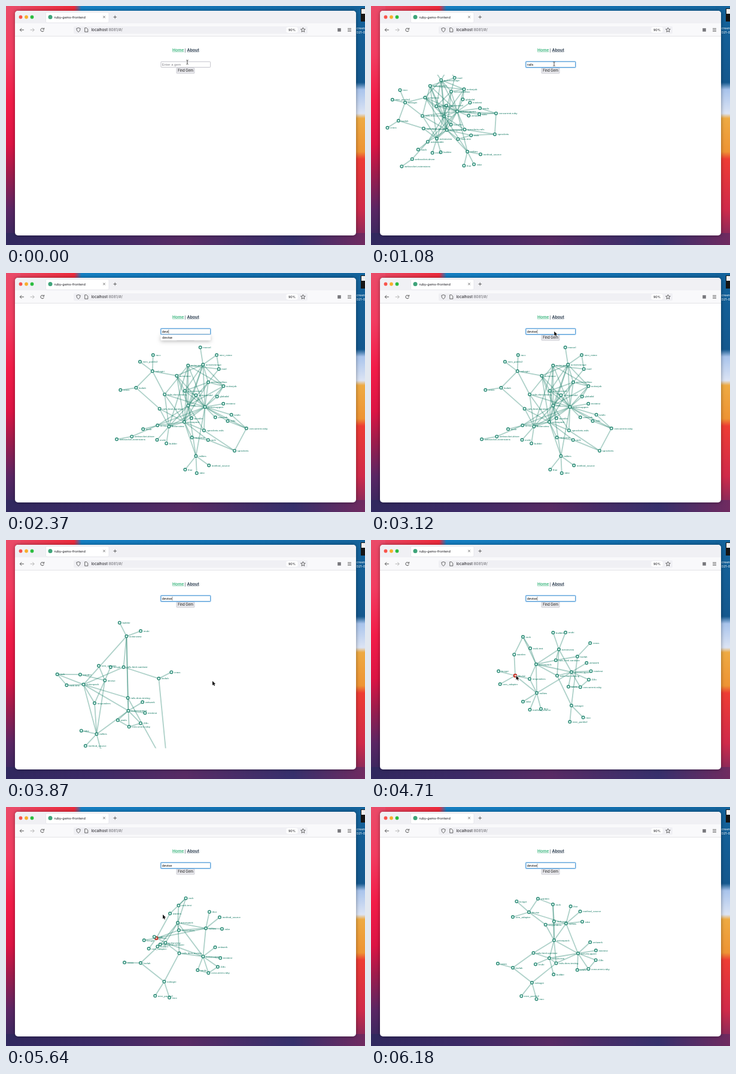
An HTML page with a canvas that plays this animation: 600 by 400 pixels, repeating every 6.21 s.

```html
<!DOCTYPE html>
<html lang="en">
<head>
<meta charset="utf-8">
<title>ruby-gems-frontend</title>
<style>
  html, body { margin: 0; width: 100%; height: 100%; overflow: hidden; }
  canvas { display: block; width: 600px; height: 400px; }
</style>
</head>
<body>
<canvas id="stage" width="600" height="400"></canvas>
<script>
const c = document.getElementById('stage').getContext('2d');
const LOOP = 6210;
const SANS = '"Liberation Sans", Arial, sans-serif';
const UI = 'Inter, "Open Sans", sans-serif';

// Which gem depends on which
const deps = {
  'rails': 'actioncable actionmailbox actionmailer actionpack actiontext actionview activejob activemodel activerecord activestorage activesupport bundler railties sprockets-rails',
  'actioncable': 'actionpack activesupport nio4r websocket-driver',
  'actionmailbox': 'actionpack activejob activerecord activestorage activesupport mail',
  'actionmailer': 'actionpack actionview activejob activesupport mail rails-dom-testing',
  'actionpack': 'actionview activesupport rack rack-test rails-dom-testing rails-html-sanitizer',
  'actiontext': 'actionpack activerecord activestorage activesupport nokogiri',
  'actionview': 'activesupport builder erubi rails-dom-testing rails-html-sanitizer',
  'activejob': 'activesupport globalid',
  'activemodel': 'activesupport',
  'activerecord': 'activemodel activesupport',
  'activestorage': 'actionpack activejob activerecord activesupport marcel mini_mime',
  'activesupport': 'concurrent-ruby i18n minitest tzinfo zeitwerk',
  'railties': 'actionpack activesupport method_source rake thor',
  'sprockets-rails': 'actionpack activesupport sprockets',
  'sprockets': 'concurrent-ruby rack',
  'tzinfo': 'concurrent-ruby',
  'i18n': 'concurrent-ruby',
  'globalid': 'activesupport',
  'mail': 'mini_mime',
  'rack-test': 'rack',
  'rails-dom-testing': 'activesupport nokogiri',
  'rails-html-sanitizer': 'loofah',
  'loofah': 'crass nokogiri',
  'nokogiri': 'mini_portile2 racc',
  'websocket-driver': 'websocket-extensions',
  'devise': 'bcrypt orm_adapter railties responders warden',
  'responders': 'actionpack railties',
  'warden': 'rack'
};

// Everything a gem needs, directly or through other gems
function makeGraph(root) {
  const names = [root], links = [];
  for (let i = 0; i < names.length; i++) {
    if (!deps[names[i]]) continue;
    for (const d of deps[names[i]].split(' ')) {
      if (!names.includes(d)) names.push(d);
      links.push([i, names.indexOf(d)]);
    }
  }
  return { names, links };
}

// Hubs stay where they are put; springs and repulsion arrange the rest
function relax(g, hubs, at) {
  const pin = g.names.map(n => hubs.indexOf(n));
  const near = g.names.map((_, i) =>
    g.links.filter(l => l.includes(i)).map(l => l[0] === i ? l[1] : l[0]));
  const hub = k => [at[2 * k], at[2 * k + 1]];
  const mean = pts => [0, 1].map(a => pts.reduce((s, p) => s + p[a], 0) / pts.length);
  const mid = mean(hubs.map((_, k) => hub(k)));
  const pos = g.names.map((_, i) => {
    if (pin[i] >= 0) return hub(pin[i]);
    const [x, y] = mean(near[i].filter(j => pin[j] >= 0).map(j => hub(pin[j])));
    const a = Math.atan2(y - mid[1], x - mid[0]) + 0.7 * Math.sin(i * 2.4);
    return [x + 22 * Math.cos(a), y + 22 * Math.sin(a)];
  });
  for (let step = 0; step < 260; step++) {
    pos.forEach((p, i) => {
      if (pin[i] >= 0) return;
      let fx = 0, fy = 0;
      pos.forEach((q, j) => {
        const dx = p[0] - q[0], dy = p[1] - q[1], d = Math.hypot(dx, dy);
        if (i === j || d < 0.01) return;
        let f = d < 80 ? 9 / d : 0;
        if (near[i].includes(j)) f -= 0.14 * (d - 20);
        fx += f * dx / d;
        fy += f * dy / d;
      });
      const damp = 0.6 / Math.max(1, Math.hypot(fx, fy) / 3);
      p[0] += fx * damp;
      p[1] += fy * damp;
    });
  }
  return pos.flat();
}

const railsGraph = makeGraph('rails');
const railsHubs = ('nokogiri actiontext actionmailer activestorage mail loofah rails-dom-testing activerecord actionmailbox activejob ' +
  'rails activesupport actionpack actionview actioncable websocket-driver sprockets-rails concurrent-ruby sprockets railties').split(' ');
const railsRest = relax(railsGraph, railsHubs, [
  246,158, 286,168, 306,152, 331,152, 357,161, 217,184, 264,198, 298,194, 338,182, 363,190,
  302,219, 330,223, 294,246, 268,252, 249,249, 205,265, 326,262, 397,263, 375,299, 310,304]);

const deviseGraph = makeGraph('devise');
const deviseHubs = 'rack devise actionpack railties activesupport actionview loofah nokogiri'.split(' ');
const [burst, grabbed, dragged, settled] = [
  [85,225, 165,235, 129,242, 151,325, 204,286, 201,161, 255,232, 270,385],
  [254,162, 241,227, 276,208, 277,256, 335,221, 314,183, 345,195, 335,277],
  [298,145, 242,252, 273,172, 340,209, 317,254, 243,208, 216,255, 261,291],
  [304,163, 264,176, 306,223, 326,195, 346,245, 298,253, 237,269, 269,294]
].map(at => relax(deviseGraph, deviseHubs, at));

const span = (t, a, b) => Math.min(1, Math.max(0, (t - a) / (b - a)));
const easeOut = u => 1 - (1 - u) ** 3;
const smooth = u => u * u * (3 - 2 * u);
const mix = (a, b, u) => a + (b - a) * u;
const mixPose = (p, q, u) => p.map((v, i) => mix(v, q[i], u));

// Scale and turn a pose about (ox, oy), then put that point at (x, y)
function place(pose, ox, oy, x, y, scale, turn) {
  const out = [], cs = Math.cos(turn) * scale, sn = Math.sin(turn) * scale;
  for (let i = 0; i < pose.length; i += 2) {
    const dx = pose[i] - ox, dy = pose[i + 1] - oy;
    out.push(x + dx * cs - dy * sn, y + dx * sn + dy * cs);
  }
  return out;
}

function railsPose(t) {
  if (t >= 1680) {
    const u = span(t, 1680, 2370);
    return place(railsRest, 300, 230, 300 + 3 * u, 230 + 3 * u, 1, -0.06 * u);
  }
  const u = span(t, 900, 1600), k = easeOut(u);
  return place(railsRest, 300, 230, mix(90, 300, smooth(u)), mix(140, 230, k),
    k + 0.25 * Math.sin(Math.PI * k), (k - 1) * 1.2);
}

function devisePose(t) {
  if (t < 3870) {
    const k = mix(0.15, 1, easeOut(span(t, 3650, 3870)));
    return place(burst, 110, 130, 110, 130, k, (k - 1) * 0.6);
  }
  if (t < 4710) return mixPose(burst, grabbed, easeOut(span(t, 3870, 4650)));
  if (t < 5280) return mixPose(grabbed, dragged, smooth(span(t, 4710, 5280)));
  return mixPose(dragged, settled, smooth(span(t, 5280, 6080)));
}

function text(s, x, y, size, color, font = SANS, weight = '', align = 'left') {
  c.font = `${weight} ${size}px ${font}`;
  c.fillStyle = color;
  c.textAlign = align;
  c.fillText(s, x, y);
  return c.measureText(s).width;
}

function box(x, y, w, h, r, fill, stroke, lw = 1) {
  c.beginPath();
  c.roundRect(x, y, w, h, r);
  if (fill) { c.fillStyle = fill; c.fill(); }
  if (stroke) { c.strokeStyle = stroke; c.lineWidth = lw; c.stroke(); }
}

function dot(x, y, r, fill) {
  c.beginPath();
  c.arc(x, y, r, 0, 7);
  c.fillStyle = fill;
  c.fill();
}

function path(pts, color, lw = 0.9, close = false) {
  c.beginPath();
  for (let i = 0; i < pts.length; i += 2) c.lineTo(pts[i], pts[i + 1]);
  if (close) c.closePath();
  c.strokeStyle = color;
  c.lineWidth = lw;
  c.stroke();
}

function fade(x, y, w, h, down, ...stops) {
  const g = down ? c.createLinearGradient(0, y, 0, y + h) : c.createLinearGradient(x, 0, x + w, 0);
  stops.forEach(([at, col]) => g.addColorStop(at, col));
  c.fillStyle = g;
  c.fillRect(x, y, w, h);
}

function desktop() {
  fade(0, 0, 600, 16, false, [0, '#ea4a68'], [0.19, '#ee2a3c'], [0.21, '#1580c4'], [0.6, '#1272b4'], [1, '#13639c']);
  fade(0, 0, 24, 400, true, [0, '#ea4a68'], [0.2, '#f23c60'], [0.4, '#f21c48'], [0.58, '#dc1444'],
    [0.7, '#a01c4c'], [0.85, '#5a2664'], [1, '#30285e']);
  fade(576, 0, 24, 400, true, [0, '#13639c'], [0.32, '#14588e'], [0.35, '#a9c4ec'], [0.45, '#dce4f4'],
    [0.47, '#eeaa42'], [0.61, '#ee9434'], [0.64, '#ee3c34'], [0.85, '#d02a4a'], [1, '#702a60']);
  fade(0, 380, 600, 20, false, [0, '#30285e'], [0.25, '#3c2a66'], [0.5, '#582a64'], [0.8, '#36306c'], [1, '#702a60']);
  box(593, 4, 10, 22, 0, '#151515');
  c.fillStyle = '#f0f0f0';
  c.fillRect(594, 5, 6, 8);
  text('creen', 585.5, 39, 5.4, '#fff', UI);
  text('021-0', 585.5, 46, 5.4, '#fff', UI);
}

function chrome() {
  c.save();
  c.shadowColor = 'rgba(0,0,0,.4)';
  c.shadowBlur = 6;
  box(15, 8, 570, 376, 5, '#fff');
  c.restore();
  c.save();
  c.beginPath();
  c.roundRect(15, 8, 570, 376, 5);
  c.clip();
  c.fillStyle = '#f0f0f4';
  c.fillRect(15, 8, 570, 21);
  c.fillStyle = '#f9f9fb';
  c.fillRect(15, 29, 570, 21);
  c.fillStyle = '#dcdce0';
  c.fillRect(15, 50, 570, 0.8);
  c.restore();

  dot(24.5, 18.5, 2.9, '#f9544c');
  dot(34, 18.5, 2.9, '#f8ae2c');
  dot(43.5, 18.5, 2.9, '#2cbd40');
  box(66.5, 10.5, 105.5, 17.5, 2, '#fff', '#dedee4', 0.6);
  dot(74, 18.4, 3.5, '#3fa47a');
  text('ruby-gems-frontend', 80.5, 20.7, 5.45, '#15141a', UI);
  path([162.2, 16.6, 165.8, 20.2], '#444', 0.7);
  path([165.8, 16.6, 162.2, 20.2], '#444', 0.7);
  path([179.5, 18.5, 184.9, 18.5], '#444', 0.8);
  path([182.2, 15.8, 182.2, 21.2], '#444', 0.8);

  const arrow = (x, d, col) => {
    path([x - 3.2 * d, 40, x + 3.4 * d, 40], col);
    path([x - 0.4 * d, 37.2, x - 3.2 * d, 40, x - 0.4 * d, 42.8], col);
  };
  arrow(26.5, 1, '#444');
  arrow(44, -1, '#aaa');
  c.beginPath();
  c.arc(60.7, 40, 2.8, 0.3, 5.5);
  c.strokeStyle = '#444';
  c.lineWidth = 0.9;
  c.stroke();
  path([63.6, 36.6, 63.6, 39, 61.2, 39], '#444', 0.9);

  box(113, 34, 391, 12.5, 2, '#f0f0f4');
  c.beginPath();
  c.moveTo(121, 36.5);
  c.lineTo(124.2, 37.6);
  c.quadraticCurveTo(124.2, 42, 121, 43.6);
  c.quadraticCurveTo(117.8, 42, 117.8, 37.6);
  c.closePath();
  c.strokeStyle = '#444';
  c.lineWidth = 0.8;
  c.stroke();
  path([131.7, 36.7, 134.7, 36.7, 136.8, 38.8, 136.8, 43.3, 131.7, 43.3], '#444', 0.8, true);
  const w = text('localhost', 142.5, 42.2, 6.4, '#15141a', UI);
  text(':8081/#/', 142.5 + w, 42.2, 6.4, '#66666c', UI);
  box(468.5, 35.5, 19, 9, 2, '#fff');
  text('90%', 478, 42.1, 5.4, '#15141a', UI, '', 'center');
  const star = [];
  for (let i = 0; i < 10; i++) {
    const r = i % 2 ? 1.8 : 4, a = i * Math.PI / 5 - Math.PI / 2;
    star.push(496.4 + r * Math.cos(a), 40.2 + r * Math.sin(a));
  }
  path(star, '#444', 0.8, true);
  box(554.2, 37.2, 5.6, 5.6, 0, '#77777c');
  for (const y of [37.7, 40, 42.3]) path([571, y, 577, y], '#444', 0.8);
}

function page() {
  const homeW = text('Home', 278, 75.6, 7, '#42b983', SANS, 'bold');
  path([278, 76.8, 278 + homeW, 76.8], '#42b983', 0.5);
  text('|', 299.7, 75.6, 7, '#2c3e50', SANS, '', 'center');
  const aboutW = text('About', 302.5, 75.6, 7, '#2c3e50', SANS, 'bold');
  path([302.5, 76.8, 302.5 + aboutW, 76.8], '#2c3e50', 0.5);
  box(285, 103.8, 30, 9, 1, '#e9e9ed', '#b4b4be', 0.6);
  text('Find Gem', 300, 110.3, 5.7, '#111', UI, '', 'center');
}

function typed(t) {
  if (t < 1840) return 'rails'.slice(0, Math.floor(span(t, 330, 680) * 5));
  if (t < 2050) return 'rails'.slice(0, 5 - Math.floor(span(t, 1840, 2000) * 5));
  return 'devise'.slice(0, Math.floor((t - 2050) / 75));
}

function form(t) {
  const focus = t > 200, value = typed(t);
  if (focus) box(258.4, 92.6, 83.8, 10.6, 1.5, null, 'rgba(80,160,230,.5)', 1.4);
  box(259, 93.2, 82.6, 9.4, 1, '#fff', focus ? '#3088cc' : '#b4b4be', 0.8);
  const w = text(value || 'Enter a gem', 260.7, 100, 5.8, value ? '#111' : '#85858c');
  const busy = (t > 330 && t < 900) || (t > 1650 && t < 2700);
  if (focus && (busy || t % 1050 > 450)) {
    const x = 261.2 + (value ? w : 0);
    path([x, 94.8, x, 101.2], '#222', 0.5);
  }
  if (t > 2125 && t < 2620) {
    c.save();
    c.shadowColor = 'rgba(0,0,0,.25)';
    c.shadowBlur = 6;
    c.shadowOffsetY = 2;
    box(258.5, 103.2, 83.5, 9.6, 1, '#fff');
    c.restore();
    text('devise', 261.3, 109.8, 5.8, '#111');
  }
}

function drawGraph(g, p, hot) {
  c.save();
  c.beginPath();
  c.rect(20, 115, 560, 233.5);
  c.clip();
  for (const [i, j] of g.links)
    path([p[2 * i], p[2 * i + 1], p[2 * j], p[2 * j + 1]], 'rgba(18,120,98,.34)', 1.8);
  g.names.forEach((name, i) => {
    const x = p[2 * i], y = p[2 * i + 1], red = name === hot;
    c.beginPath();
    c.arc(x, y, 2.3, 0, 7);
    c.fillStyle = red ? '#f3c4b4' : '#dcfaf3';
    c.fill();
    c.strokeStyle = red ? '#c22a22' : '#2f8a76';
    c.lineWidth = red ? 1.8 : 1.4;
    c.stroke();
    text(name, x + 4.6, y + 1.6, 4.4, '#127862');
  });
  c.restore();
}

function pointer(x, y) {
  const pts = [0, 0, 0, 7.2, 1.7, 5.7, 2.9, 8.2, 4.1, 7.6, 3, 5.2, 5.1, 5.1];
  path(pts.map((v, i) => v + (i % 2 ? y : x)), '#fff', 1.2, true);
  c.fillStyle = '#111';
  c.fill();
}

function beam(x, y) {
  path([x, y - 3, x, y + 3], '#222', 0.8);
  for (const s of [-1, 1]) path([x - 1.7, y + 3.6 * s, x, y + 2.8 * s, x + 1.7, y + 3.6 * s], '#222', 0.7);
}

// Mouse stops: time, x, y
const stops = [[3100, 306, 97], [3600, 345, 236], [4000, 345, 236], [4620, 242.5, 226.5],
  [4750, 242.5, 227], [5280, 233.5, 256.5], [5600, 262, 180], [5950, 262, 180]];

function mouse(t) {
  if (t < 1900) {
    const u = smooth(span(t, 100, 800));
    return beam(mix(303, 306, u), mix(94, 97, u));
  }
  for (let i = 1; i < stops.length; i++) {
    const [a, x0, y0] = stops[i - 1], [b, x1, y1] = stops[i];
    if (t >= a && t < b) {
      const u = smooth(span(t, a, b));
      return pointer(mix(x0, x1, u), mix(y0, y1, u));
    }
  }
}

function draw(t) {
  c.clearRect(0, 0, 600, 400);
  c.lineJoin = 'round';
  desktop();
  chrome();
  page();
  if (t >= 3650) drawGraph(deviseGraph, devisePose(t), t > 4600 && t < 5650 ? 'devise' : '');
  else if (t >= 900) drawGraph(railsGraph, railsPose(t));
  form(t);
  mouse(t);
}

const begin = performance.now();
function tick() {
  draw((performance.now() - begin) % LOOP);
  requestAnimationFrame(tick);
}
tick();
</script>
</body>
</html>
```
